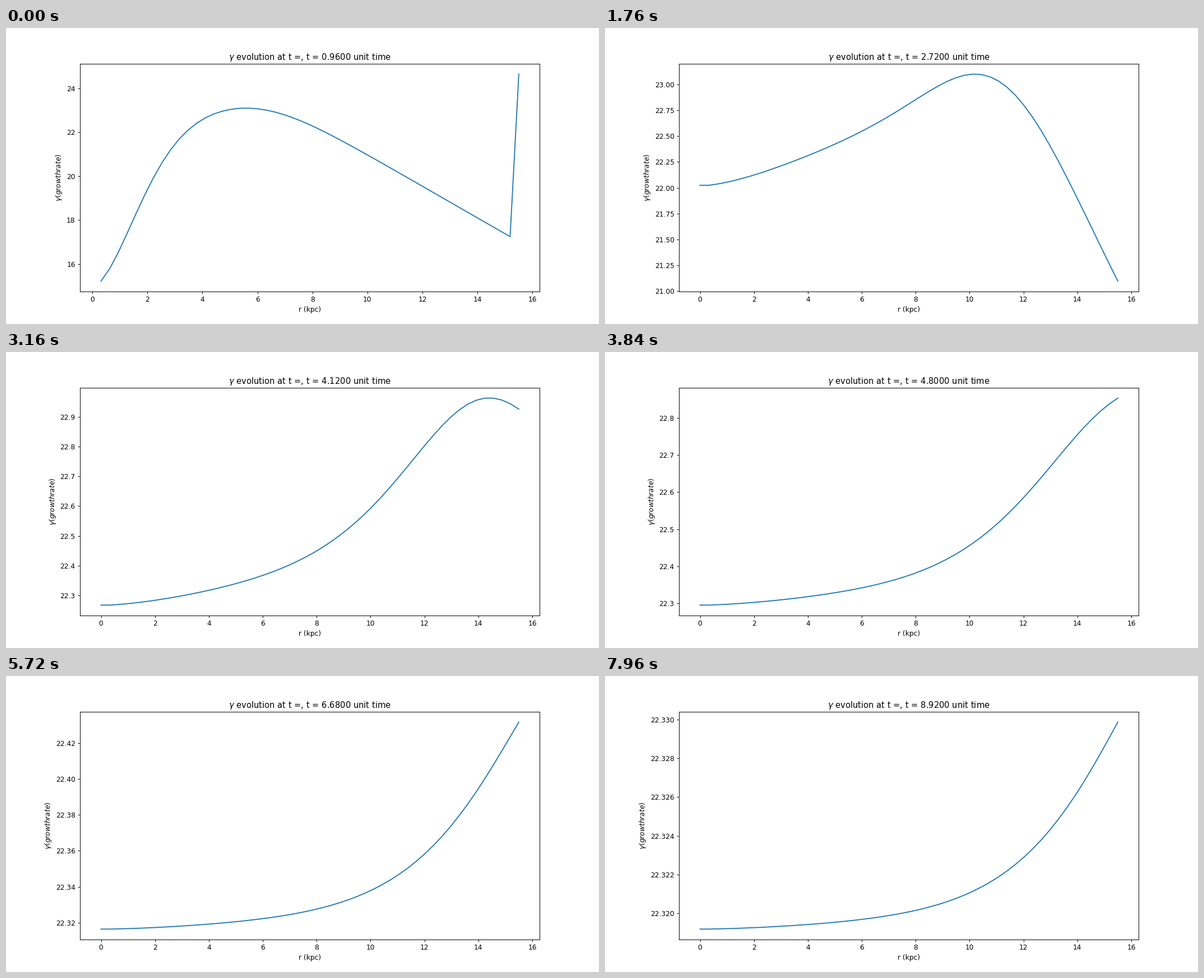
A matplotlib script that plays this animation: 1058 by 529 pixels, repeating every 8000 ms.

```python
import numpy as np
import matplotlib.pyplot as plt
from matplotlib.animation import FuncAnimation

FRAMES, INTERVAL = 200, 40
T0, DT = 0.96, 0.04
R_MAX = 15.5
REST = 22.31944          # growth rate everything settles to
DECAY = 1.09             # speed of that settling
EDGE_START, EDGE_DECAY = 24.647, 5.0
CENTRE_START = 10        # step at which the r = 0 point becomes finite

r = np.linspace(0, R_MAX, 50)


def ease(t, mid, width):
    return 1 / (1 + np.exp(-(t - mid) / width))


def wave(t):
    """Hump of fast growth that travels outwards and leaves an exponential tail."""
    late = ease(t, 2.7, 0.25)
    taper = 0.27 * late * (r / R_MAX) ** 8
    x = np.exp(0.385 * r - taper - 1.12 - DECAY * t)
    sharp = 1.14 + 0.95 * (1 - ease(t, 3.4, 0.83))
    soft_log = np.log1p(x ** sharp) / sharp
    return x * np.exp(-soft_log) * (1.8 - (1.87 - 0.27 * late) * soft_log)


def core(t):
    """Slow growth around the centre, widening while it fades."""
    depth = 5.15 * np.exp(-DECAY * t) * (1 + 12.7 * np.exp(-1.44 * t))
    width = 6.3 * (1 - np.exp(-0.46 * t))
    return depth * np.exp(-(r / width) ** 1.75)


def smooth_growth(t):
    gamma = REST + wave(t) - core(t)
    gamma[0] = gamma[1]
    return gamma


SPIKE = EDGE_START - smooth_growth(T0)[-1]


def growth(t):
    gamma = smooth_growth(t)
    gamma[-1] += SPIKE * np.exp(-EDGE_DECAY * (t - T0))
    return gamma


fig, ax = plt.subplots(figsize=(12, 6), dpi=88.1667)
fig.subplots_adjust(top=0.8792)
line, = ax.plot([], [])
ax.set_xlabel("r (kpc)")
ax.set_ylabel(r"$\gamma (growthrate)$")
title = ax.set_title("")


def update(i):
    t = T0 + DT * i
    first = 0 if i >= CENTRE_START else 1
    line.set_data(r[first:], growth(t)[first:])
    ax.relim()
    ax.autoscale_view()
    title.set_text(rf"$\gamma$ evolution at t =, t = {t:.4f} unit time")
    return line, title


anim = FuncAnimation(fig, update, frames=FRAMES, interval=INTERVAL, repeat=True)
plt.show()
```
